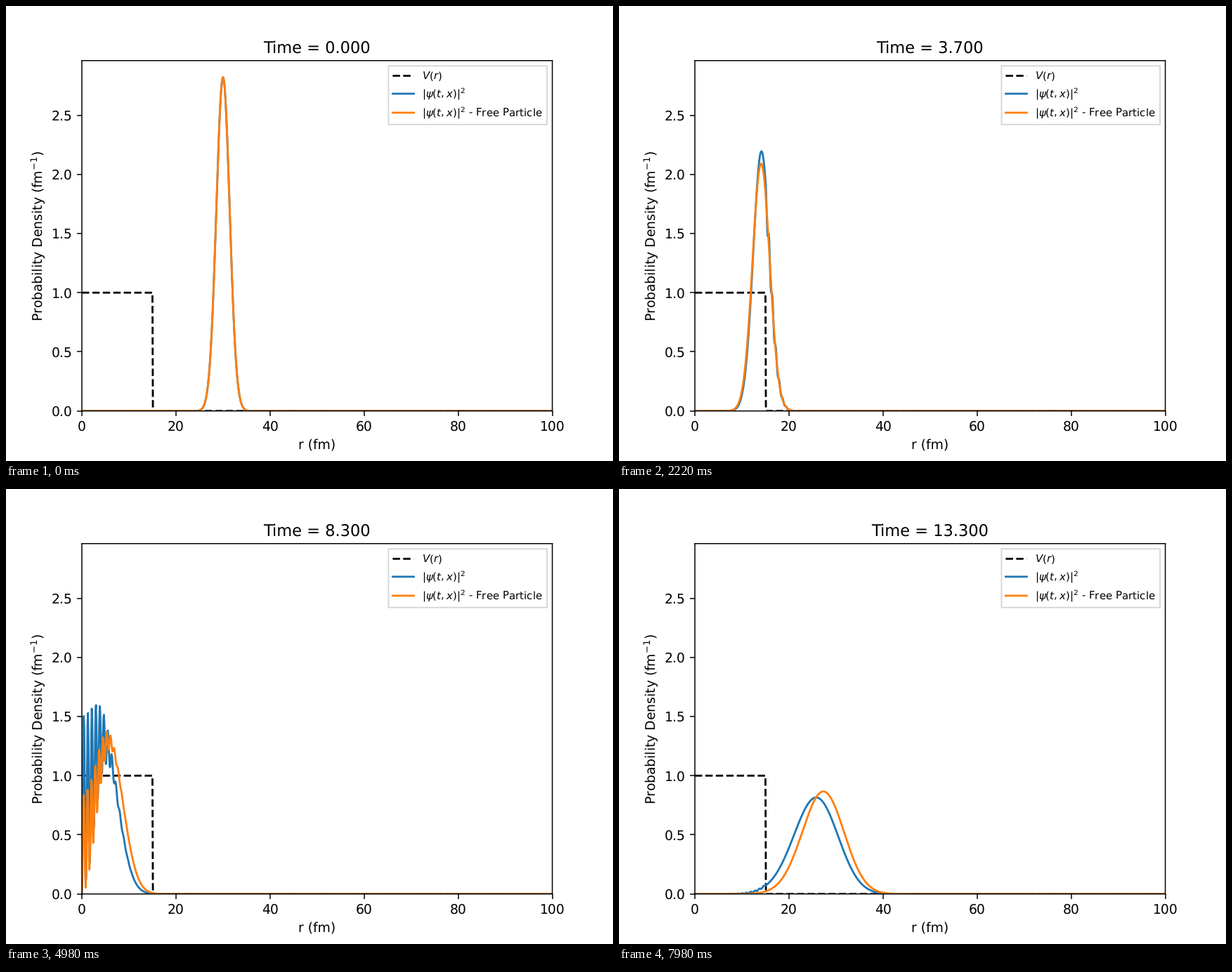
These frames come from a looping animation (864x648 px, 8000 ms). A matplotlib script:

```python
import numpy as np
import matplotlib.pyplot as plt
from matplotlib.animation import FuncAnimation

# Unhinted text and unsnapped lines keep sub-pixel positions
plt.rcParams.update({"text.hinting": "none", "path.snap": False})

# Natural units: hbar = m = 1
R_MAX, DR = 100.0, 0.1
DT = 0.01                 # Crank-Nicolson time step
R0, SIGMA, K0 = 30.0, 2.0, 4.46
V0, EDGE = 1.0, 15.0
SCALE = 10.0              # display factor of the density
RENORM = 0.96             # density factor once the propagation has started

STATES, T_STEP = 134, 0.1
TICK, TICKS_PER_STATE, TICKS = 20, 3, 400

r = np.linspace(0, R_MAX, int(round(R_MAX / DR)) + 1)
barrier = np.where(r <= EDGE + DR / 2, V0, 0.0)
times = T_STEP * np.arange(STATES)

psi0 = (np.pi * SIGMA**2) ** -0.25 * np.exp(
    -(r - R0) ** 2 / (2 * SIGMA**2) - 1j * K0 * r)


def evolve(potential):
    """Density at every time, one row per state, with walls at both ends."""
    inner = slice(1, -1)
    n = r.size - 2
    hop = np.full(n - 1, -0.5 / DR**2)
    ham = np.diag(potential[inner] + 1 / DR**2) + np.diag(hop, 1) + np.diag(hop, -1)
    levels, modes = np.linalg.eigh(ham)
    omega = 2 / DT * np.arctan(levels * DT / 2)
    weights = modes.T @ psi0[inner]
    psi = modes @ (weights[:, None] * np.exp(-1j * np.outer(omega, times)))
    density = np.zeros((STATES, r.size))
    density[:, inner] = SCALE * np.abs(psi.T) ** 2
    density[1:] *= RENORM
    return density


scattered = evolve(barrier)
free = evolve(np.zeros_like(r))

fig, ax = plt.subplots(figsize=(6.4, 4.8), dpi=135)
ax.plot(r, barrier, "k--", label="$V(r)$")
line, = ax.plot(r, scattered[0], label=r"$|\psi(t,x)|^2$")
free_line, = ax.plot(r, free[0], label=r"$|\psi(t,x)|^2$ - Free Particle")
ax.set_xlim(0, R_MAX)
ax.set_ylim(0, 1.05 * free[0].max())
ax.set_xlabel("r (fm)")
ax.set_ylabel("Probability Density (fm$^{-1}$)")
ax.legend(loc="upper right", fontsize=8, fancybox=False, labelspacing=0.4)
title = ax.set_title("Time = 0.000")


def update(tick):
    i = tick // TICKS_PER_STATE
    line.set_ydata(scattered[i])
    free_line.set_ydata(free[i])
    title.set_text(f"Time = {times[i]:.3f}")
    return line, free_line, title


anim = FuncAnimation(fig, update, frames=TICKS, interval=TICK,
                     repeat=True, repeat_delay=0, blit=False)
plt.show()
```
